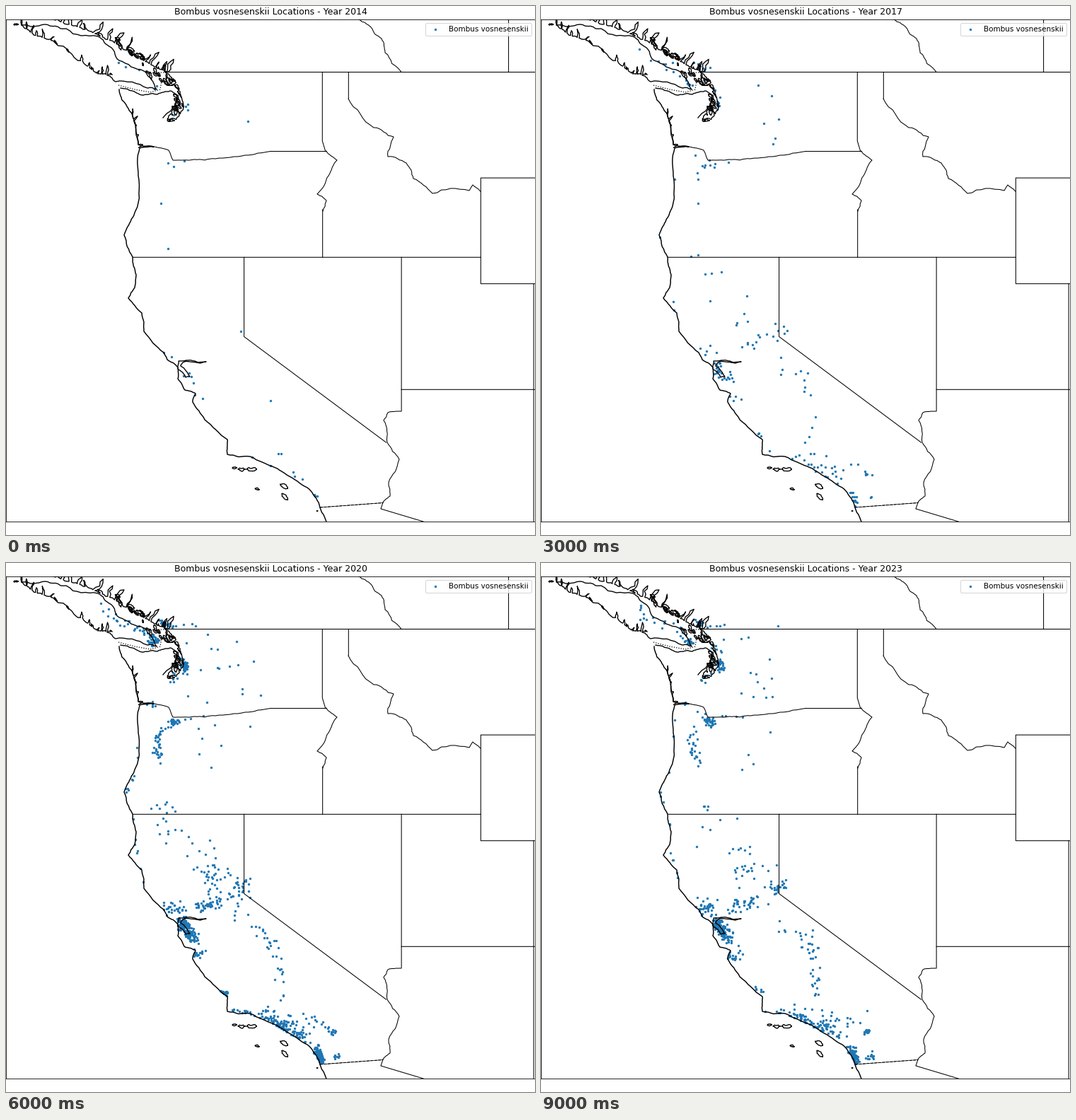
Write a matplotlib script that moves like this. It is 748 px wide and 748 px high and loops after 10000 ms.

```python
import numpy as np
import matplotlib.pyplot as plt
from matplotlib.animation import FuncAnimation

SIZE, DPI = 748, 74.8
WEST, EAST, SOUTH, NORTH = -129, -109, 32, 51
DEG = SIZE / (EAST - WEST)                  # pixels per degree
TOP = (SIZE - (NORTH - SOUTH) * DEG) / 2
BOTTOM = SIZE - TOP
FIRST_YEAR = 2014
SPECIES = "Bombus vosnesenskii"
TOTALS = [36, 60, 120, 175, 360, 560, 860, 740, 720, 700]

rng = np.random.default_rng(8)
fig = plt.figure(figsize=(SIZE / DPI, SIZE / DPI), dpi=DPI, facecolor="white")
ax = fig.add_axes([0, TOP / SIZE, 1, 1 - 2 * TOP / SIZE])
ax.set(xlim=(0, SIZE), ylim=(BOTTOM, TOP), xticks=[], yticks=[])


def path(*xy):
    return np.reshape(xy, (-1, 2)).astype(float)


def along(pts, t):
    """Points at fractions t of a polyline, every segment counting the same."""
    k = np.arange(len(pts))
    u = np.asarray(t) * (len(pts) - 1)
    return np.column_stack([np.interp(u, k, pts[:, 0]), np.interp(u, k, pts[:, 1])])


def draw(pts, lw=1.0, ls="-"):
    ax.plot(*pts.T, color="black", lw=lw, ls=ls, snap=False, zorder=1.5)


def geo(*lonlat):
    """Straight state line through longitude, latitude pairs."""
    p = path(*lonlat)
    draw(np.column_stack([(p[:, 0] - WEST) * DEG, TOP + (NORTH - p[:, 1]) * DEG]))


def roughen(pts, amp=0.12, depth=3):
    """Midpoint displacement: each pass bends every segment a little."""
    for _ in range(depth):
        a, d = pts[:-1], np.diff(pts, axis=0)
        normal = np.column_stack([-d[:, 1], d[:, 0]])
        out = np.empty((len(pts) * 2 - 1, 2))
        out[::2] = pts
        out[1::2] = a + d / 2 + normal * rng.uniform(-amp, amp, (len(a), 1))
        pts = out
    return pts


def fjords(pts, n, reach):
    """Cut n narrow inlets into the left-hand side of a shore."""
    base = along(pts, np.linspace(0, 1, n))
    step = np.gradient(base, axis=0)
    normal = np.column_stack([step[:, 1], -step[:, 0]])
    normal /= np.hypot(*normal.T)[:, None]
    tip = base + normal * reach * rng.uniform(0.1, 1, (n, 1))
    tip += step * rng.uniform(-0.8, 0.8, (n, 1))
    return np.stack([base, tip, base + step * 0.3], axis=1).reshape(-1, 2)


def island(x, y, r, tilt=0, flat=0.4):
    t = np.linspace(0, 2 * np.pi, 7)
    z = (r * np.cos(t) + 1j * flat * r * np.sin(t)) * np.exp(1j * np.radians(tilt))
    draw(roughen(np.column_stack([x + z.real, y + z.imag]), 0.25, 2), 1.3)


def islets(pts, n, spread):
    for x, y in along(pts, rng.random(n)) + rng.normal(0, spread, (n, 2)):
        island(x, y, rng.uniform(2, 6), rng.uniform(20, 90))


def draw_borders():
    geo(-122.9, 49, EAST, 49)
    geo(-110, 51, -110, 49)
    geo(-124.2, 42, -111.05, 42)
    geo(EAST, 45, -111.05, 45, -111.05, 41, EAST, 41)
    geo(-109.05, 41, -109.05, SOUTH)
    geo(-114.05, 37, EAST, 37)
    geo(-120, 42, -120, 39, -114.63, 35)
    geo(-114.05, 42, -114.05, 36.2)
    geo(-117.04, 49, -117.04, 46.4, -116.92, 46)
    geo(-117.03, 43.8, -117.03, 42)
    geo(-116.05, 49, -116.05, 48)
    # mountain ridges and rivers
    draw(roughen(path(499, 19, 516, 30, 531, 46, 536, 66, 559, 93.5)))
    draw(roughen(path(484, 131, 520, 172, 548, 185, 540, 213, 566, 222, 576, 244,
                      603, 265, 655, 261, 660, 253, 671, 262)))
    draw(roughen(path(209, 199, 230, 204, 236, 218, 266, 217, 296, 216,
                      338, 211, 374, 205.5), 0.05))
    draw(path(374, 205.5, 453, 205.5))
    draw(roughen(path(453, 205, 468, 218, 456, 240, 440, 266, 453, 275, 448, 290), 0.08))
    draw(roughen(path(559, 573, 540, 575, 534, 586, 539, 617, 556, 641,
                      541, 674, 543, 693, 533, 702), 0.08))
    # national borders
    draw(path(444, 709, 533, 702.5), 0.6)
    draw(path(444, 709, 533, 702.5), 1, "--")
    draw(path(533, 702, 530, 711, 591, BOTTOM))
    draw(path(159, 112, 182, 118, 204, 122, 218, 118, 220, 106, 213, 94, 228, 94), 1.2, ":")


COAST = path(160, 118, 164, 133, 178, 152, 183, 168, 187, 196, 209, 199, 189, 201,
             187, 240, 183, 290, 176, 305, 167, 324, 179, 355, 184, 380, 182, 398,
             173, 413, 192, 434, 195, 460, 223, 490, 228, 500, 243, 511, 243, 527,
             253, 543, 268, 548, 264, 560, 281, 585, 313, 613, 313, 634, 345, 637,
             381, 653, 397, 663, 426, 681, 442, 702, 453, BOTTOM)
MAINLAND = path(66, 19, 110, 32, 150, 50, 182, 70, 212, 87, 228, 93)
OUTER = path(22, 27, 40, 41, 66, 49, 112, 82, 129, 96, 148, 97)
SOUND = path(228, 94, 239, 106, 247, 122, 251, 145, 242, 160, 226, 165,
             234, 150, 242, 130)


def draw_coast():
    draw(roughen(COAST, 0.07), 1.4)
    draw(roughen(fjords(COAST[2:5], 5, 8), 0.1, 1), 1.3)
    # bay and delta
    draw(roughen(path(243, 511, 244, 502, 262, 501, 283, 503, 250, 504, 247, 509,
                      260, 524, 254, 525, 243, 513)), 1.3)
    # northern island, fjords and sound
    draw(roughen(fjords(OUTER, 15, 13), 0.2, 2), 1.3)
    draw(roughen(path(143, 98, 155, 107, 200, 116, 213, 118, 208, 107, 195, 92,
                      160, 77, 143, 55, 130, 43, 85, 32, 55, 26, 22, 27)), 1.3)
    draw(roughen(fjords(MAINLAND, 20, 21), 0.22, 2), 1.3)
    draw(roughen(fjords(SOUND, 13, -9), 0.2, 2), 1.3)
    draw(roughen(path(162, 116, 187, 124, 214, 125, 232, 120, 242, 126, 238, 142,
                      222, 158)), 1.3)
    islets(MAINLAND[2:5], 12, 3)
    islets(path(194, 92, 213, 104, 236, 106), 12, 3)
    islets(path(242, 116, 243, 140, 238, 157), 8, 2)
    island(14, 26, 3)
    # southern islands
    for spot in [(323, 653, 3), (333, 655, 5), (347, 655, 7), (355, 683, 3, 15),
                 (393, 679, 6, 30), (394, 694, 6, 45), (440, 714, 0.6)]:
        island(*spot)


# spread, weight and path of each habitat
NORTHERN = [
    (4, 9, path(135, 58, 155, 82, 188, 88, 208, 108)),
    (3, 8, path(205, 109, 213, 113)),
    (2.5, 6, path(217, 84, 231, 88)),
    (2.5, 1.5, path(231, 89, 272, 86)),
    (2.5, 10, path(251, 138, 254, 151)),
    (4, 4, path(243, 110, 250, 132, 236, 162, 226, 168)),
    (3, 10, path(231, 222, 243, 225)),
    (3, 3, path(195, 197, 250, 218, 290, 215)),
    (4, 7, path(220, 235, 213, 262, 222, 280)),
    (5, 2.5, path(202, 345, 240, 346)),
    (1.5, 5, path(189, 205, 182, 300, 168, 325, 183, 400, 195, 455)),
    (22, 5, path(290, 110, 320, 160, 285, 275)),
]
CENTRAL = [
    (16, 4, path(215, 375, 275, 400)),
    (9, 12, path(282, 408, 300, 465, 345, 510, 378, 530)),
    (4, 9, path(268, 488, 302, 476)),
    (6, 8, path(325, 465, 344, 454)),
    (8, 4, path(265, 440, 320, 440)),
    (6, 9, path(225, 490, 246, 485)),
    (4, 26, path(246, 507, 252, 518, 268, 532)),
    (4, 8, path(250, 508, 262, 520)),
    (3, 6, path(266, 550, 272, 560, 284, 549)),
]
SOUTHERN = [
    (5, 9, path(375, 535, 386, 560, 390, 615)),
    (2, 4, path(304, 604, 312, 609)),
    (3, 10, path(318, 634, 362, 638, 382, 650)),
    (4, 22, path(375, 648, 398, 657, 424, 671)),
    (6, 12, path(365, 628, 400, 648, 456, 648)),
    (2, 4, path(458, 662, 463, 664)),
    (3, 26, path(438, 686, 446, 706)),
    (2.5, 3, path(463, 699, 469, 695)),
]
HABITATS = NORTHERN + CENTRAL + SOUTHERN


def sightings(i):
    gen = np.random.default_rng(FIRST_YEAR + i)
    weights = np.array([weight for _, weight, _ in HABITATS])
    counts = gen.multinomial(TOTALS[i], weights / weights.sum())
    pts = np.vstack([along(p, gen.random(n)) + gen.normal(0, spread, (n, 2))
                     for (spread, _, p), n in zip(HABITATS, counts)])
    # keep every dot on land and north of the border
    pts[:, 1] = np.minimum(pts[:, 1], 708)
    shore = np.interp(pts[:, 1], COAST[:, 1], COAST[:, 0], left=0)
    pts[:, 0] = np.maximum(pts[:, 0], shore)
    return pts


draw_borders()
draw_coast()
POINTS = [sightings(i) for i in range(len(TOTALS))]
dots = ax.scatter([], [], s=5, color="#1f77b4", label=SPECIES, zorder=1)
ax.legend(loc="upper right")
title = ax.set_title("")


def update(i):
    dots.set_offsets(POINTS[i])
    title.set_text(f"{SPECIES} Locations - Year {FIRST_YEAR + i}")
    return dots, title


anim = FuncAnimation(fig, update, frames=len(TOTALS), interval=1000,
                     init_func=lambda: update(0), repeat=True, repeat_delay=0)
plt.show()
```
